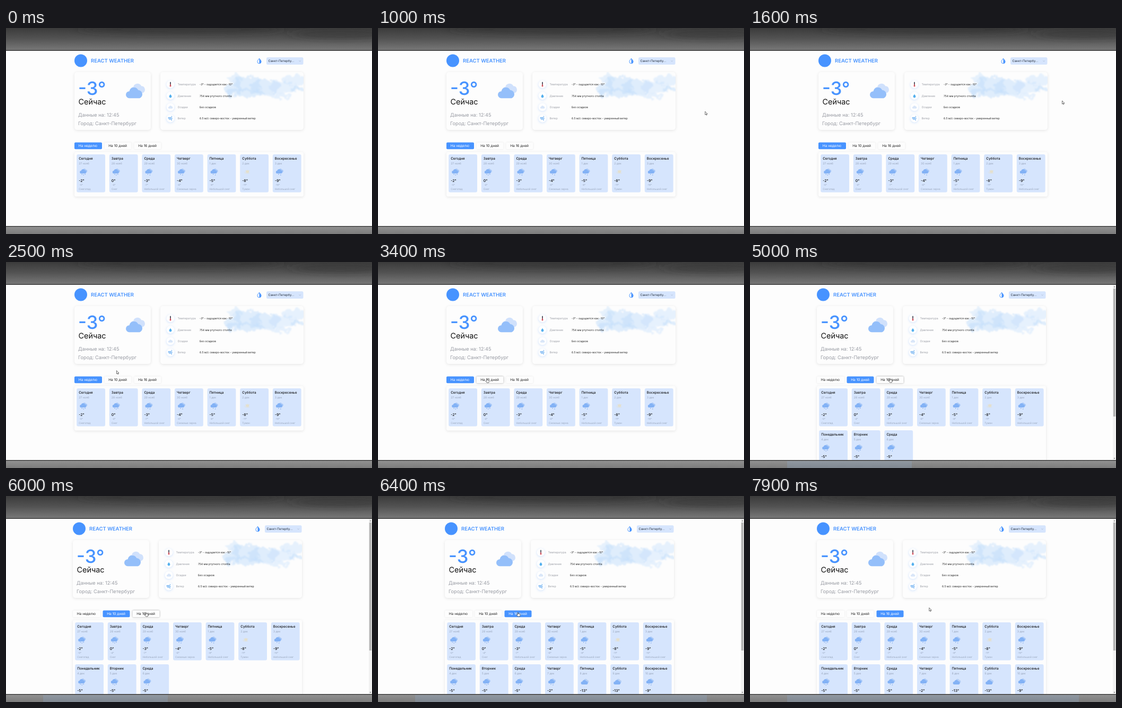
An HTML page that plays this animation: 690x388 px, repeating every 8 s.

```html
<!DOCTYPE html>
<html lang="ru">
<head>
<meta charset="utf-8">
<title>Weather</title>
<style>
html, body { margin: 0; height: 100%; overflow: hidden; background: #fdfdfd; }
svg { display: block; width: 690px; height: 388px; }
text { font-family: Inter, "Open Sans", sans-serif; text-rendering: geometricPrecision; white-space: pre; }
.panel { fill: #fdfdfd; filter: drop-shadow(0 1px 2.5px #0000001a); }
</style>
</head>
<body>
<svg id="stage" viewBox="0 0 690 388">
  <defs>
    <clipPath id="window"><rect y="43" width="690" height="330"/></clipPath>
    <clipPath id="details"><rect x="291" y="83" width="270" height="109" rx="5"/></clipPath>
    <linearGradient id="top" x2="0" y2="1">
      <stop stop-color="#3b3b3b"/><stop offset=".45" stop-color="#515151"/><stop offset="1" stop-color="#787878"/>
    </linearGradient>
    <linearGradient id="bottom" x2="0" y2="1"><stop stop-color="#929292"/><stop offset="1" stop-color="#7c7c7c"/></linearGradient>
    <filter id="soft" x="-30%" y="-80%" width="160%" height="260%"><feGaussianBlur stdDeviation="14 5"/></filter>
    <filter id="wash" x="-20%" y="-20%" width="140%" height="140%">
      <feTurbulence type="fractalNoise" baseFrequency=".07" numOctaves="4" seed="8"/>
      <feDisplacementMap in="SourceGraphic" scale="22" xChannelSelector="R" yChannelSelector="G"/>
      <feGaussianBlur stdDeviation=".8"/>
    </filter>
    <path id="cloud" d="M4 14a4 4 0 0 1 0-8a5.5 5.5 0 0 1 10.4-1.3a4.8 4.8 0 0 1 1.6 9.3z"/>
  </defs>
  <rect width="690" height="388" fill="#fdfdfd"/>
  <g clip-path="url(#window)">
    <g id="page"></g>
    <g id="scrollbar">
      <rect x="684" y="43" width="6" height="330" fill="#f1f1f1"/>
      <rect x="684.8" y="50" width="4.4" height="241" fill="#b5b5b5"/>
      <path d="M685.5 47.5l1.5-2 1.5 2zM685.5 369l1.5 2 1.5-2z" fill="#777"/>
    </g>
  </g>
  <rect width="690" height="42" fill="url(#top)"/>
  <g filter="url(#soft)">
    <ellipse cx="330" cy="3" rx="190" ry="9" fill="#333" opacity=".5"/>
    <ellipse cx="630" cy="12" rx="90" ry="9" fill="#333" opacity=".4"/>
  </g>
  <rect y="374" width="690" height="14" fill="url(#bottom)"/>
  <rect id="tint" x="70" y="375" height="13" fill="#8fb0dc" opacity=".22"/>
  <path d="M0 42.4H690M0 373.6H690" stroke="#2b2b2b" stroke-width="1.1"/>
  <g id="cursor" stroke="#333" stroke-width=".7" stroke-linejoin="round" fill="#fff">
    <path id="arrow" d="M0 0V6.2L1.4 5 2.4 7 3.4 6.5 2.5 4.6H4.4Z"/>
    <path id="hand" d="M.2.7Q.8-.3 1.4.7V3Q3.5 2.5 5 3.8Q5.3 6 4.2 8H.7Q-.4 6.4-1.8 5Q-1.6 3.9.2 5Z"/>
  </g>
</svg>
<script>
const $ = id => document.getElementById(id);
const BLUE = '#4793ff', PALE = '#d6e5fd', GRAY = '#989ba3', LOOP = 8000;

const text = (x, y, size, str, fill = '#111', weight = 400) =>
  `<text x="${x}" y="${y}" font-size="${size}" fill="${fill}" font-weight="${weight}">${str}</text>`;
const rect = (x, y, w, h, r, attrs) =>
  `<rect x="${x}" y="${y}" width="${w}" height="${h}" rx="${r}" ${attrs}/>`;
const cloud = (x, y, scale, fill) =>
  `<use href="#cloud" transform="translate(${x} ${y}) scale(${scale})" fill="${fill}"/>`;
const drop = (x, y, scale, attrs) =>
  `<path d="M0-5C2-2.2 3.8-.6 3.8 1.4A3.8 3.8 0 0 1-3.8 1.4C-3.8-.6-2-2.2 0-5Z" transform="translate(${x} ${y}) scale(${scale})" ${attrs}/>`;

const header = () => `
  <circle cx="141" cy="61.5" r="12" fill="${BLUE}"/>
  ${text(160, 65.2, 9.5, 'REACT WEATHER', BLUE, 600)}
  ${drop(477.5, 62, .95, `fill="none" stroke="${BLUE}"`)}
  <path d="M477.5 57.3C479.4 60 481 61.5 481 63.3A3.6 3.6 0 0 1 477.5 66.9Z" fill="${BLUE}"/>
  ${rect(491, 55.3, 69.5, 13.6, 2.5, `fill="${PALE}"`)}
  ${text(494.5, 64, 5.9, 'Санкт-Петербу...', '#26303d')}
  <path d="M552.3 61.5l1.8 1.5 1.8-1.5" fill="none" stroke="#a9b8cf" stroke-width=".7"/>`;

const now = () => `
  ${rect(129, 83, 144, 109, 5, 'class="panel"')}
  ${text(136, 125.5, 34.5, '-3°', BLUE, 500)}
  ${text(136.5, 144, 14.4, 'Сейчас')}
  ${text(136, 167, 9.2, 'Данные на: 12:45', GRAY)}
  ${text(136, 183.2, 9.2, 'Город: Санкт-Петербург', GRAY)}
  ${cloud(234.5, 102.5, 1.43, '#d0e1fc')}${cloud(226, 109.5, 1.62, '#94bffa')}`;

function sky() {
  const puffs = [[428, 112, 18, 13], [455, 106, 28, 16], [488, 111, 26, 14], [452, 122, 38, 7],
    [520, 112, 28, 11], [545, 99, 24, 10], [436, 95, 13, 6], [512, 127, 24, 5], [555, 116, 18, 5]];
  return `<g clip-path="url(#details)"><g filter="url(#wash)" fill="#bfdcfb">` + puffs.map(([x, y, rx, ry], i) =>
    `<ellipse cx="${x}" cy="${y}" rx="${rx}" ry="${ry}" opacity="${[4, 5, 6, 7].includes(i) ? .38 : .48}"/>`).join('') + '</g></g>';
}

function details() {
  const rows = [['Температура', '-3° - ощущается как -10°'], ['Давление', '754 мм ртутного столба'],
    ['Осадки', 'Без осадков'], ['Ветер', '6.5 м/с северо-восток - умеренный ветер']];
  const icons = [
    '<path d="M310 102.5V109" stroke="#515968" stroke-width="2" stroke-linecap="round"/><path d="M310 105V109" stroke="#e8606a"/><circle cx="310" cy="109" r="1.5" fill="#d94f5c"/>',
    drop(310, 128, .65, 'fill="#55b0ee"'),
    cloud(305.8, 145.5, .45, '#d9e6f8'),
    '<path d="M305.5 168.5H312Q314 166 311.5 166.3M305.5 170.3H314M307 172H312Q313.5 174 311.3 174" fill="none" stroke="#5ca6ef" stroke-width="1"/>'];
  return rect(291, 83, 270, 109, 5, 'class="panel"') + sky() + rows.map(([label, value], i) => {
    const y = 106.2 + i * 21.4;
    return `<circle cx="310" cy="${y}" r="7.3" fill="#fff" style="filter:drop-shadow(0 1px 2px #4793ff40)"/>` +
      icons[i] + text(323.5, y + 1.9, 5.25, label, GRAY) + text(365, y + 1.9, 5.1, value, '#1d1d1d');
  }).join('');
}

const tabNames = ['На неделю', 'На 10 дней', 'На 16 дней'];
const tabX = [129, 185.5, 241.5];
const tabs = () => tabNames.map((name, i) =>
  `<g id="tab${i}">${rect(tabX[i], 215.5, i ? 51 : 52, 12.8, 2, '')}${text(tabX[i] + 7.7, 224.2, 6.6, name)}</g>`).join('');

const dayNames = ['Сегодня', 'Завтра', 'Среда', 'Четверг', 'Пятница', 'Суббота', 'Воскресенье', 'Понедельник', 'Вторник'];
const highs = [-2, 0, -3, -4, -5, -8, -9, -5, -5, -5, -2, -13, -13, -9];
const lows = [-5, -4, -7, -6, -6, -11, -10];
const notes = ['Снегопад', 'Снег', 'Небольшой снег', 'Снежные зерна', 'Небольшой снег', 'Туман', 'Небольшой снег'];

function dayIcon(i, x, y) {
  if (i === 5) return `<g stroke="#e9dfbd" stroke-width="1" stroke-linecap="round" opacity=".85">
    <circle cx="${x + 1}" cy="${y}" r="3" fill="#eadfbd" stroke="none"/>
    <path d="M${x - 5} ${y + 1}h9M${x - 4} ${y + 3}h9M${x - 3} ${y - 2}h8" stroke="#dfe2df"/></g>`;
  if (i === 11 || i === 12) return cloud(x - 4, y - 6, .62, '#b5cff6') + cloud(x - 7, y - 4, .68, '#83b2f5');
  const flakes = i % 7 < 2 ? [-3, 0, 3] : [-2, 2];
  return cloud(x - 4, y - 6.5, .58, '#a9c9f8') + cloud(x - 7, y - 5.5, .64, '#83b2f5') +
    flakes.map((dx, k) => `<circle cx="${x + dx}" cy="${y + 5 + k % 2 * 1.3}" r=".75" fill="#6c9ee8"/>`).join('');
}

function day(i) {
  const x = 133.2 + i % 7 * 61.6, y = i < 7 ? 238 : 317;
  const name = dayNames[i] || dayNames[i - 7];
  const date = i < 4 ? `${27 + i} нояб` : `${i - 3} дек`;
  return `<g id="day${i}">${rect(x, y, 53.8, 71.6, 3, `fill="${PALE}"`)}
    ${text(x + 4, y + 9.6, 6.4, name, '#111', 500)}
    ${text(x + 4, y + 18.6, 5.2, date, '#97a4ba')}
    ${dayIcon(i, x + 13, y + 32.5)}
    ${text(x + 4, y + 52, 6.9, highs[i] + '°', '#111', 500)}
    ${text(x + 5, y + 58.7, 4.3, lows[i % 7] + '°', '#8f9db4')}
    ${text(x + 4, y + 66.5, 4.75, notes[i % 7], '#97a4ba')}</g>`;
}

$('page').innerHTML = header() + now() + details() + tabs() +
  `<rect id="forecast" x="129" y="233.5" width="432" rx="4" class="panel"/>` + highs.map((_, i) => day(i)).join('');

// Pointer path: time, x, y
const path = [[800, 622, 161], [1600, 588.5, 137], [1800, 598.5, 133.5], [1900, 598.5, 133.5], [2500, 208.5, 204.5],
  [2600, 208.5, 204.5], [2900, 204.5, 219.3], [4600, 204.5, 219.3], [5000, 263, 219], [7100, 263, 219],
  [7350, 295, 234.5], [7600, 334.5, 216], [7700, 334.5, 216], [7900, 337.8, 210.5], [LOOP, 337.8, 210.5]];

function pointer(t) {
  const i = path.findIndex(p => p[0] > t);
  if (i <= 0) return null;
  const [t0, x0, y0] = path[i - 1], [t1, x1, y1] = path[i];
  const u = (t - t0) / (t1 - t0), k = u * u * (3 - 2 * u);
  return [x0 + (x1 - x0) * k, y0 + (y1 - y0) * k];
}

function draw(t) {
  const active = t < 4200 ? 0 : t < 6400 ? 1 : 2;
  const count = [7, 10, 14][active], shift = active ? -3 : 0;
  const at = pointer(t);
  const hovered = at && at[1] > 215 && at[1] < 228 ?
    tabX.findIndex(x => at[0] >= x + shift && at[0] <= x + shift + 51) : -1;

  $('page').setAttribute('transform', `translate(${shift})`);
  $('scrollbar').style.display = $('tint').style.display = active ? '' : 'none';
  $('tint').setAttribute('width', active === 1 ? 235 : 550);
  $('forecast').setAttribute('height', active ? 163 : 84);
  highs.forEach((_, i) => $('day' + i).style.display = i < count ? '' : 'none');
  tabX.forEach((_, i) => {
    const [box, label] = $('tab' + i).children, on = i === active;
    box.setAttribute('fill', on ? BLUE : '#fdfdfd');
    box.style.filter = on ? '' : `drop-shadow(0 .5px 1.5px ${i === hovered ? '#00000060' : '#00000018'})`;
    label.setAttribute('fill', on ? '#fff' : '#222');
  });

  $('cursor').style.display = at ? '' : 'none';
  if (at) $('cursor').setAttribute('transform', `translate(${at})`);
  $('hand').style.display = hovered >= 0 ? '' : 'none';
  $('arrow').style.display = hovered < 0 ? '' : 'none';
}

function tick() {
  draw(performance.now() % LOOP);
  requestAnimationFrame(tick);
}
tick();
</script>
</body>
</html>
```
